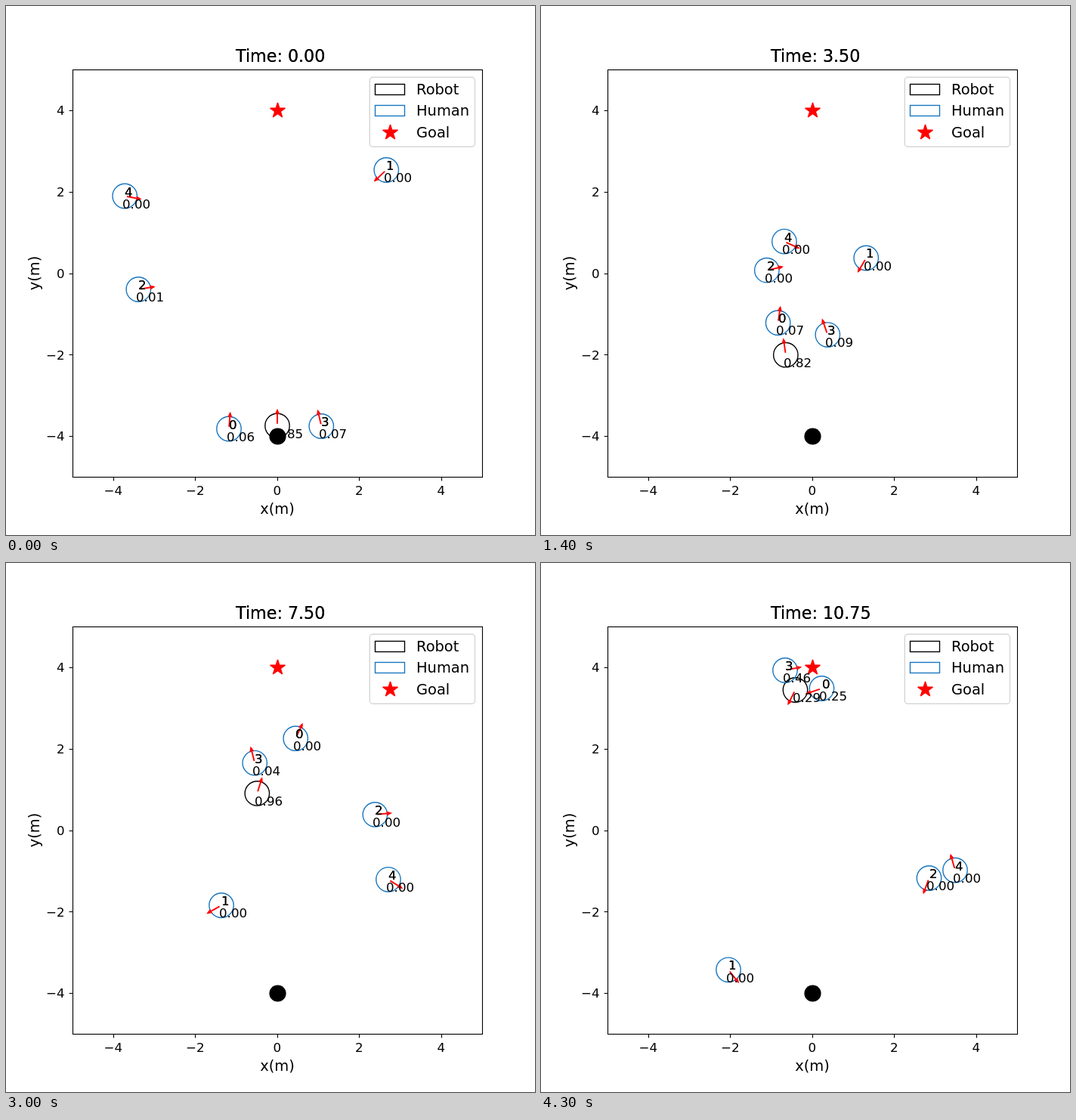
An HTML page with a canvas for the animation above (4400 ms loop, 700 by 700 pixels).

```html
<!DOCTYPE html>
<html lang="en">
<head>
<meta charset="utf-8">
<title>Robot among humans</title>
<style>
  html, body { margin: 0; width: 100%; height: 100%; overflow: hidden; background: #fff; }
  canvas { display: block; width: 700px; height: 700px; }
</style>
</head>
<body>
<canvas id="stage" width="700" height="700"></canvas>
<script>
const ctx = document.getElementById('stage').getContext('2d');
const STEP_MS = 100, STEPS = 44, DT = 0.25;
const BOX = { l: 88.5, t: 84.5, r: 630.5, b: 623.5 };
const BLUE = '#1976c0', RED = '#ff0000', THIN = 1.11, LINE = 1.39;
const SMALL = 16.67, MEDIUM = 19.44, LARGE = 22.22;

const snap = v => Math.floor(v + 0.5) + 0.5;
const toX = v => 358.75 + v * 54.25;
const toY = v => 353.5 - v * 53.9;

// The robot hops in straight lines: step, x, y
const robotPath = [
  [-1, 359, 569], [0, 359, 555.5], [3, 366.5, 532.5], [4, 353.5, 537.5], [9, 341.5, 503],
  [10, 329, 498], [17, 320, 434.5], [18, 320, 421], [22, 304, 391], [26, 317, 354],
  [35, 351.5, 243.5], [42, 343, 155], [43, 336.5, 168]
];

// Humans glide through one waypoint per key step;
// attention is a sum of bumps: peak, centre step, width
const KEY_STEPS = [0, 4, 10, 18, 26, 35, 38, 43];
const humans = [
  {
    path: [[295, 559.5], [298.7, 522], [308, 460], [322.5, 377], [361, 282], [410, 173], [416, 155], [371.5, 166]],
    bumps: [[.056, 0, 5], [.09, 11, 7], [.25, 43, 4]]
  },
  {
    path: [[503.3, 217], [481.7, 241.3], [451, 297], [405.3, 368], [330, 426], [230.5, 484], [218, 494], [248, 538.3]],
    bumps: [[.01, 18, 4]]
  },
  {
    path: [[175.3, 375], [209, 369], [264, 357.5], [337.5, 343], [441.3, 337], [538, 332], [536, 352], [513.5, 417]],
    bumps: [[.02, 4, 7]]
  },
  {
    path: [[417.3, 556], [409, 523], [391.5, 470], [367, 398.5], [342.5, 315.3], [312.5, 197.5], [304, 157], [323, 142]],
    bumps: [[.184, 4.5, 3.8], [.094, 16, 13], [.46, 43, 6.2]]
  },
  {
    path: [[157.2, 251.5], [200.5, 262], [272.3, 290], [371, 335.5], [463, 392], [553, 447.5], [558, 446], [548, 406.5]],
    bumps: [[.012, 7, 6]]
  }
];

function robotAt(step) {
  const i = Math.max(1, robotPath.findIndex(k => k[0] >= step));
  const [s0, x0, y0] = robotPath[i - 1], [s1, x1, y1] = robotPath[i];
  const u = (step - s0) / (s1 - s0);
  return [x0 + (x1 - x0) * u, y0 + (y1 - y0) * u];
}

function slope(path, i, c) {
  const last = path.length - 1;
  const rate = (a, b) => (path[b][c] - path[a][c]) / (KEY_STEPS[b] - KEY_STEPS[a]);
  if (i === 0) return 1.5 * rate(0, 1) - 0.5 * rate(0, 2);
  if (i === last) return 1.5 * rate(last - 1, last) - 0.5 * rate(last - 2, last);
  return rate(i - 1, i + 1);
}

function humanAt(path, step) {
  let i = 0;
  while (i < path.length - 2 && step > KEY_STEPS[i + 1]) i++;
  const span = KEY_STEPS[i + 1] - KEY_STEPS[i], u = (step - KEY_STEPS[i]) / span, v = 1 - u;
  return [0, 1].map(c =>
    path[i][c] * v * v * (1 + 2 * u) + path[i + 1][c] * u * u * (3 - 2 * u) +
    span * u * v * (v * slope(path, i, c) - u * slope(path, i + 1, c)));
}

// Place plus heading, taken from the motion just before
function pose(at, step) {
  const [x, y] = at(step), [px, py] = at(step - 0.01);
  return { x, y, angle: Math.atan2(y - py, x - px) };
}

const attention = (bumps, step) =>
  bumps.reduce((sum, [peak, mid, width]) => sum + peak * Math.exp(-(((step - mid) / width) ** 2)), 0);

function text(str, x, y, size, align = 'left') {
  ctx.font = size + 'px "DejaVu Sans", sans-serif';
  ctx.textAlign = align;
  ctx.fillStyle = '#000';
  ctx.fillText(str, x, y);
}

// Drawn twice for the heavier edge
function boldText(...args) {
  text(...args);
  text(...args);
}

function line(points, color, width) {
  ctx.beginPath();
  points.forEach(([x, y]) => ctx.lineTo(x, y));
  ctx.strokeStyle = color;
  ctx.lineWidth = width;
  ctx.stroke();
}

function rect(x, y, w, h, color, width) {
  ctx.strokeStyle = color;
  ctx.lineWidth = width;
  ctx.strokeRect(x, y, w, h);
}

function star(cx, cy) {
  ctx.beginPath();
  for (let i = 0; i < 10; i++) {
    const r = i % 2 ? 3.98 : 10.42, a = i * Math.PI / 5;
    ctx.lineTo(cx + r * Math.sin(a), cy - r * Math.cos(a));
  }
  ctx.closePath();
  ctx.fillStyle = ctx.strokeStyle = RED;
  ctx.lineWidth = LINE;
  ctx.lineJoin = 'bevel';
  ctx.fill();
  ctx.stroke();
  ctx.lineJoin = 'miter';
}

function disc(x, y, r) {
  ctx.beginPath();
  ctx.arc(x, y, r, 0, 2 * Math.PI);
}

function ring(p, color) {
  disc(p.x, p.y, 16.2);
  ctx.strokeStyle = color;
  ctx.lineWidth = LINE;
  ctx.stroke();
}

function arrow(p) {
  ctx.save();
  ctx.translate(p.x, p.y);
  ctx.rotate(p.angle);
  line([[2.8, 0], [20.5, 0]], RED, 1.9);
  line([[15.4, -2.4], [21, 0], [15.4, 2.4]], RED, LINE);
  ctx.restore();
}

function weightLabel(p, value) {
  text(value.toFixed(2), Math.round(p.x - 3.1), Math.round(p.y + 16.2), SMALL);
}

function axes() {
  rect(BOX.l, BOX.t, BOX.r - BOX.l, BOX.b - BOX.t, '#000', THIN);
  for (let v = -4; v <= 4; v += 2) {
    const x = toX(v), y = toY(v), label = String(v).replace('-', '\u2212');
    line([[snap(x), BOX.b], [snap(x), BOX.b + 4.9]], '#000', THIN);
    line([[BOX.l, snap(y)], [BOX.l - 4.9, snap(y)]], '#000', THIN);
    text(label, x, 647, SMALL, 'center');
    text(label, 77.5, Math.round(y + 6.2), SMALL, 'right');
  }
  text('x(m)', 359, 672, MEDIUM, 'center');
  ctx.save();
  ctx.translate(44, 353.5);
  ctx.rotate(-Math.PI / 2);
  text('y(m)', 0, 0, MEDIUM, 'center');
  ctx.restore();
}

function legend() {
  ctx.beginPath();
  ctx.roundRect(481.3, 94.3, 139.2, 92, 4);
  ctx.fillStyle = 'rgba(255,255,255,.8)';
  ctx.fill();
  ctx.strokeStyle = 'rgba(204,204,204,.8)';
  ctx.lineWidth = LINE;
  ctx.stroke();
  rect(488.5, 103.5, 39, 14, '#000', LINE);
  rect(488.5, 131.5, 39, 14, BLUE, LINE);
  star(508.5, 167.5);
  ['Robot', 'Human', 'Goal'].forEach((name, i) => text(name, 543, Math.floor(117 + i * 28.5), MEDIUM));
}

function draw(step) {
  ctx.fillStyle = '#fff';
  ctx.fillRect(0, 0, 700, 700);

  const robot = pose(robotAt, step);
  const crowd = humans.map(h => pose(s => humanAt(h.path, s), step));
  const weights = humans.map(h => attention(h.bumps, step));

  ring(robot, '#000');
  crowd.forEach(p => ring(p, BLUE));
  [robot, ...crowd].forEach(arrow);

  disc(snap(toX(0)), snap(toY(-4)), 11.1);
  ctx.fillStyle = '#000';
  ctx.fill();
  star(snap(toX(0)), snap(toY(4)));
  axes();

  weightLabel(robot, 1 - weights.reduce((a, b) => a + b));
  crowd.forEach((p, i) => {
    weightLabel(p, weights[i]);
    boldText(String(i), Math.round(p.x), Math.round(p.y), SMALL);
  });
  boldText('Time: ' + (step * DT).toFixed(2), 304, 74, LARGE);
  legend();
}

const t0 = performance.now();
function tick() {
  const t = Math.max(0, performance.now() - t0);
  draw(Math.floor(t / STEP_MS) % STEPS);
  requestAnimationFrame(tick);
}
tick();
</script>
</body>
</html>
```
